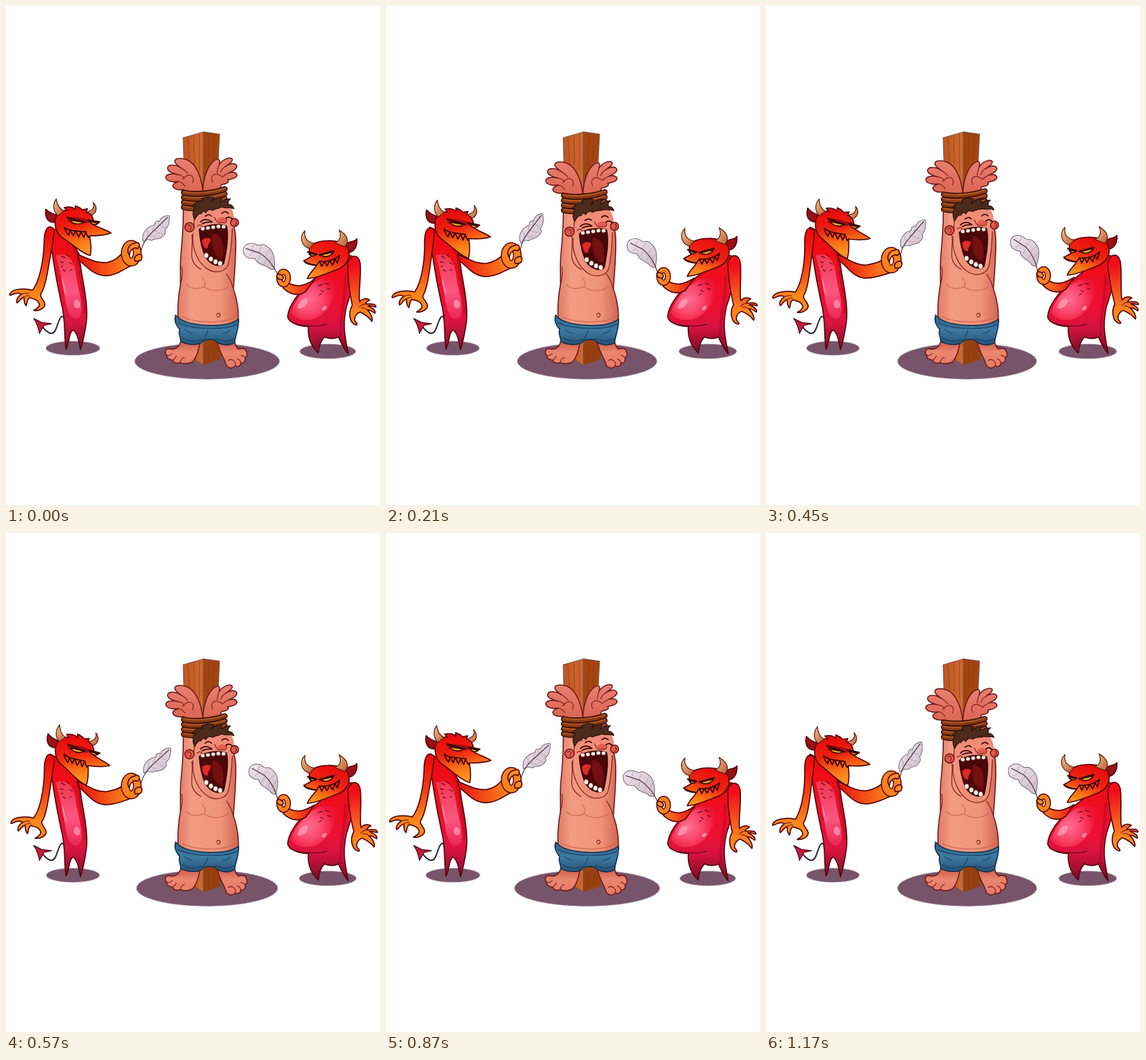
Write an HTML page that moves like this. It is 648 px wide and 864 px high and loops after 1.2 s.

```html
<!DOCTYPE html>
<html lang="en">
<head>
<meta charset="utf-8">
<title>Tickle</title>
<style>
html, body { margin: 0; width: 100%; height: 100%; overflow: hidden; background: #fff; }
svg { display: block; width: 648px; height: 864px; }
path, ellipse, circle { stroke-linejoin: round; stroke-linecap: round; }
.shade { fill: #78546a; stroke: #b5abbb; stroke-width: 1; }
.skin { stroke: #6e1c1c; stroke-width: 1.9; }
.dev { stroke: #56060c; stroke-width: 2; }
.ln { fill: none; stroke: #842723; stroke-width: 1.5; }
.ink { fill: none; stroke: #360505; stroke-width: 2; }
.thin { fill: none; stroke: #5e0a18; stroke-width: 1.4; }
.soft { fill: none; stroke: #c95c4a; stroke-width: 2; opacity: .6; }
.dusk { fill: none; stroke: #8c0a20; stroke-width: 5; opacity: .35; }
.horn { fill: url(#horn); stroke: #642010; stroke-width: 1.5; }
.vane { fill: url(#vane); stroke: #7a6a76; stroke-width: 1.2; }
.quill { fill: none; stroke: #46303a; stroke-width: 1.4; }
.barb { fill: none; stroke: #ad9aa8; stroke-width: .9; }
.rope { fill: none; stroke: #3a1006; stroke-width: 10; }
.cord { fill: none; stroke: #8a3a16; stroke-width: 6.6; }
.gleam { fill: none; stroke: #b9602c; stroke-width: 1.6; }
.eye { fill: #ffae18; stroke: #360606; stroke-width: 2; }
.tooth { fill: #fff4ea; stroke: #5d1a18; stroke-width: .8; }
</style>
</head>
<body>
<svg viewBox="0 0 648 864" xmlns="http://www.w3.org/2000/svg">
<defs>
  <linearGradient id="skin" gradientUnits="userSpaceOnUse" x1="300" y1="0" x2="403" y2="0">
    <stop offset="0" stop-color="#e47c68"/><stop offset=".2" stop-color="#f29c83"/><stop offset=".7" stop-color="#ee947a"/><stop offset="1" stop-color="#d26553"/>
  </linearGradient>
  <linearGradient id="cheek" gradientUnits="userSpaceOnUse" x1="0" y1="350" x2="0" y2="462">
    <stop offset="0" stop-color="#ef8a76"/><stop offset=".5" stop-color="#f09680"/><stop offset="1" stop-color="#ec8d75"/>
  </linearGradient>
  <linearGradient id="palm" x1="0" y1="0" x2="0" y2="1">
    <stop offset="0" stop-color="#e97f70"/><stop offset="1" stop-color="#d9614f"/>
  </linearGradient>
  <linearGradient id="foot" gradientUnits="userSpaceOnUse" x1="0" y1="582" x2="0" y2="626">
    <stop offset="0" stop-color="#cf5c4b"/><stop offset=".4" stop-color="#ea8670"/><stop offset="1" stop-color="#e57a66"/>
  </linearGradient>
  <linearGradient id="denim" x1="0" y1="0" x2="0" y2="1">
    <stop offset="0" stop-color="#2f628a"/><stop offset=".5" stop-color="#3d7aa3"/><stop offset="1" stop-color="#275276"/>
  </linearGradient>
  <linearGradient id="oak" gradientUnits="userSpaceOnUse" x1="306" y1="0" x2="343" y2="0">
    <stop offset="0" stop-color="#bd5520"/><stop offset="1" stop-color="#d06c30"/>
  </linearGradient>
  <linearGradient id="oakDark" gradientUnits="userSpaceOnUse" x1="0" y1="220" x2="0" y2="620">
    <stop offset="0" stop-color="#a5460f"/><stop offset="1" stop-color="#96400f"/>
  </linearGradient>
  <linearGradient id="horn" x1="0" y1="0" x2="1" y2="1">
    <stop offset="0" stop-color="#f3c290"/><stop offset="1" stop-color="#b85c32"/>
  </linearGradient>
  <linearGradient id="vane" x1="0" y1="0" x2="1" y2="1">
    <stop offset="0" stop-color="#efe6ed"/><stop offset="1" stop-color="#cdbbc8"/>
  </linearGradient>
  <linearGradient id="body" gradientUnits="userSpaceOnUse" x1="0" y1="385" x2="0" y2="600">
    <stop offset="0" stop-color="#f00a0c"/><stop offset=".45" stop-color="#ea1028"/><stop offset=".75" stop-color="#dc1440"/><stop offset="1" stop-color="#76102a"/>
  </linearGradient>
  <linearGradient id="bodyR" gradientUnits="userSpaceOnUse" x1="0" y1="435" x2="0" y2="602">
    <stop offset="0" stop-color="#f00c12"/><stop offset=".5" stop-color="#ee1032"/><stop offset=".72" stop-color="#d81240"/><stop offset="1" stop-color="#760c24"/>
  </linearGradient>
  <linearGradient id="belly" gradientUnits="userSpaceOnUse" x1="0" y1="428" x2="0" y2="545">
    <stop offset="0" stop-color="#f0364c"/><stop offset=".55" stop-color="#fb5680"/><stop offset="1" stop-color="#ea2450"/>
  </linearGradient>
  <radialGradient id="bellyR" gradientUnits="userSpaceOnUse" cx="524" cy="508" r="46">
    <stop offset="0" stop-color="#ff6f92"/><stop offset=".5" stop-color="#fb476e"/><stop offset="1" stop-color="#ee1434"/>
  </radialGradient>
  <linearGradient id="limb" gradientUnits="userSpaceOnUse" x1="0" y1="395" x2="0" y2="500">
    <stop offset="0" stop-color="#f00c0c"/><stop offset=".45" stop-color="#f03a12"/><stop offset="1" stop-color="#fb8a1a"/>
  </linearGradient>
  <linearGradient id="limbR" gradientUnits="userSpaceOnUse" x1="0" y1="450" x2="0" y2="530">
    <stop offset="0" stop-color="#f00e1c"/><stop offset="1" stop-color="#fb861e"/>
  </linearGradient>
  <linearGradient id="reach" gradientUnits="userSpaceOnUse" x1="125" y1="0" x2="215" y2="0">
    <stop offset="0" stop-color="#e21010"/><stop offset=".5" stop-color="#f24e16"/><stop offset="1" stop-color="#fb861c"/>
  </linearGradient>
  <linearGradient id="reachR" gradientUnits="userSpaceOnUse" x1="530" y1="0" x2="478" y2="0">
    <stop offset="0" stop-color="#ea1418"/><stop offset="1" stop-color="#fb861c"/>
  </linearGradient>
  <linearGradient id="faceL" gradientUnits="userSpaceOnUse" x1="112" y1="352" x2="134" y2="424">
    <stop offset="0" stop-color="#e90a0c"/><stop offset=".4" stop-color="#ee220e"/><stop offset=".75" stop-color="#f87016"/><stop offset="1" stop-color="#fb9420"/>
  </linearGradient>
  <linearGradient id="faceR" gradientUnits="userSpaceOnUse" x1="566" y1="406" x2="542" y2="470">
    <stop offset="0" stop-color="#e90a0c"/><stop offset=".45" stop-color="#ee2412"/><stop offset=".8" stop-color="#f87016"/><stop offset="1" stop-color="#fb9420"/>
  </linearGradient>
</defs>

<ellipse id="shM" class="shade" cx="348.5" cy="615" ry="31.2"/>
<ellipse id="shL" class="shade" cx="116" cy="592.5" ry="12.3"/>
<ellipse id="shR" class="shade" cx="557.5" cy="598" ry="12.8"/>

<!-- post -->
<g stroke="#7b5148" stroke-width="1.3">
  <path d="M307 228L342 218L342 622L328 613L312 400Z" fill="url(#oak)"/>
  <path d="M342 218L370 222L366 300L372 612L342 622Z" fill="url(#oakDark)"/>
</g>
<path class="ln" opacity=".45" d="M315 228L318 270M326 224C324 240 328 250 326 275M335 222L335 285M351 222L350 275M361 222C358 240 361 250 358 268M350 592L351 616M361 590L360 612"/>

<!-- tied man -->
<path class="skin" fill="url(#skin)" d="M307 340C308 372 306 400 303 430C301 455 303 470 302 484C298 505 297 530 299 552C330 562 380 562 402 550C404 530 402 512 394 490C396 460 399 430 398 402C397 375 386 365 384 338Z"/>
<path class="ln" d="M322 396C324 412 321 424 322 436C324 446 330 452 338 456M305 452C307 466 304 476 302 484M393 488C391 476 386 470 382 464"/>
<path class="soft" d="M312 482C322 492 334 490 343 486C356 496 374 494 386 486M340 470C346 478 346 482 343 486M306 538C330 550 380 550 396 538"/>
<path class="ln" d="M365 535C366 531 371 531 371 535C371 538 368 539 366 538"/>
<g id="hands">
  <path class="skin" fill="url(#palm)" d="M341 320C339 300 331 273 313 266C300 262 290 264 293 271C296 276 300 278 304 281C296 275 282 273 280 280C279 287 290 290 298 292C288 289 275 291 277 298C280 305 292 305 299 304C292 306 286 310 291 315C297 320 305 318 308 318L308 330L341 330Z"/>
  <path class="skin" fill="url(#palm)" d="M341 320C342 300 348 276 362 267C369 263 372 267 369 275C373 268 384 261 391 264C395 268 387 273 380 278C388 272 398 271 400 277C400 283 392 286 386 289C394 286 401 289 400 294C397 300 388 300 384 301C388 304 383 308 374 309C370 315 372 318 378 317L378 330L341 330Z"/>
  <path class="ln" d="M304 281C309 284 313 287 315 290M298 292C304 293 308 296 309 299M306 300C317 286 329 295 323 306M299 304C305 305 308 309 310 312M369 275C367 281 366 286 366 289M380 278C375 281 373 285 372 288M375 296C362 286 352 294 358 305M386 289C380 291 377 294 375 296"/>
</g>
<g id="rope"></g>
<path class="skin" fill="url(#foot)" d="M303 580C300 592 292 596 282 593C274 594 275 603 279 605C277 611 286 613 289 613C291 620 299 619 302 617C309 622 317 619 322 617C330 610 333 598 336 584Z"/>
<path class="skin" fill="url(#foot)" d="M366 582C370 600 378 610 380 617C382 628 392 629 397 623C402 626 407 623 407 618C413 619 416 614 414 609C419 607 418 600 416 598C416 592 408 592 403 594C398 590 397 586 396 580Z"/>
<path class="ln" d="M279 605C283 606 286 604 288 602M289 613C292 611 294 609 295 606M302 617C303 612 306 609 309 609M397 623C400 616 391 609 385 614M407 618C406 614 404 612 401 611M414 609C412 606 410 605 407 605"/>
<path fill="url(#denim)" stroke="#14304a" stroke-width="1.9" d="M294 535C303 547 325 552 350 553C375 554 393 550 403 542C404 557 398 568 396 583C386 589 370 588 361 578C353 577 348 577 341 580C338 588 316 588 303 581C302 570 298 567 301 560C294 552 291 545 294 535Z"/>
<path fill="none" stroke="#1d456a" stroke-width="1.5" d="M298 548C320 560 380 562 400 551M341 580C344 574 348 569 350 562M305 574C316 581 330 582 340 577M363 575C374 582 386 581 396 576M309 560C315 564 318 566 322 567M389 561C383 566 379 567 376 567"/>

<g id="face">
  <path fill="url(#cheek)" d="M329 350C325 368 325 383 323 398C322 425 332 446 350 456C364 464 381 461 385 447C390 430 391 405 392 390C397 372 396 356 388 347Z"/>
  <path class="ln" d="M328 356C326 366 325 374 326 384M324 394C321 420 333 446 350 456C364 464 381 460 385 447C389 430 391 412 392 386"/>
  <circle class="skin" cx="318" cy="383" r="8" fill="#dd594f"/>
  <circle class="skin" cx="396" cy="375" r="7" fill="#dd594f"/>
  <path class="ln" d="M314 380C319 377 323 382 319 388M397 371C401 375 399 379 396 379"/>
  <path fill="#4a080a" stroke="#360505" stroke-width="2" d="M335 387C345 379 368 376 382 381C386 398 382 424 377 446C370 453 354 448 346 435C339 420 336 403 335 387Z"/>
  <path fill="#74100f" d="M358 394C374 396 380 412 375 438C362 436 354 418 358 394Z"/>
  <path fill="#df2a26" stroke="#6d0d12" d="M339 406C342 401 350 400 355 403C356 409 350 411 350 419C346 422 343 419 341 414Z"/>
  <g id="teeth"></g>
  <path class="ink" d="M337 374C343 368 351 369 357 374M340 377C347 373 352 374 357 374M380 369C384 364 389 365 392 369M345 364C350 360 354 361 356 364M374 359C378 355 382 356 385 359" stroke-width="1.5"/>
  <path class="ln" d="M331 381C335 378 338 379 340 381M361 366C363 369 364 371 365 373"/>
  <ellipse cx="374" cy="371" rx="7.5" ry="5" fill="#e65a52"/>
  <path class="ln" d="M366 373C367 377 372 376 375 375C380 377 383 374 382 370"/>
</g>
<path id="hair" fill="#4c2a1c" stroke="#2a120c" stroke-width="1.4" d="M327 370C322 361 324 352 328 347L322 348C327 340 334 337 341 338L339 334C347 330 355 330 360 332C357 335 356 338 356 340C361 334 368 331 376 331C372 335 371 338 372 340C376 336 382 334 389 334C384 338 384 341 385 344C390 343 393 346 395 351C386 347 380 352 374 348C368 352 362 350 358 354C354 352 350 351 346 358C343 354 341 354 338 360C335 358 330 363 327 370Z"/>

<!-- slim devil -->
<path fill="none" stroke="#2c2a40" stroke-width="2.4" d="M102 542C96 530 92 544 87 558C82 572 73 568 63 555"/>
<path fill="#c81a38" stroke="#421024" stroke-width="1.5" d="M48 541L62 548L79 550L66 553L58 567C56 556 53 548 48 541Z"/>
<path class="dev" fill="url(#body)" d="M76 383C76 410 86 470 96 515C104 545 100 570 104 594C110 585 108 566 116 561C124 566 126 580 129 595C134 580 140 550 140 535C141 500 129 465 127 430L108 398Z"/>
<path class="dusk" d="M104 400C112 412 121 420 124 432C127 468 137 500 137 530"/>
<path fill="url(#belly)" d="M86 432C105 426 118 435 122 470C127 500 135 520 129 537C116 549 106 535 102 505C97 475 92 452 86 432Z"/>
<path fill="#ffa0b8" opacity=".7" d="M119 510C125 505 132 517 126 523C119 525 115 518 119 510ZM97 470C102 480 101 490 106 502C100 495 97 482 97 470Z"/>
<path class="thin" d="M96 433L102 436M105 430L109 434M94 443L99 444M110 444L115 447M99 457L103 459M111 458L114 456M96 452L98 450"/>
<path id="reachL" class="dev" fill="url(#reach)"/>
<g id="armL">
  <path class="dev" fill="url(#limb)" d="M84 387C72 375 66 389 66 410C65 445 57 478 46 492C35 489 12 488 7 498C5 502 8 501 12 499C20 496 24 497 27 499C20 503 17 510 19 514C23 512 24 507 31 504C32 508 30 514 35 519C37 514 36 508 41 505C46 507 57 508 58 518C55 525 50 525 48 527C58 529 69 522 67 515C65 507 59 506 60 499C70 486 75 440 81 410Z"/>
  <path class="ln" d="M27 499C32 497 36 497 39 498M31 504C35 501 38 501 41 502"/>
</g>
<g id="featherL">
  <path class="vane" d="M238 408C233 394 245 381 258 379C256 375 262 371 266 373C268 365 278 362 283 363C284 374 281 384 275 388C278 392 276 396 270 400C268 404 258 402 252 406C246 403 242 405 238 408Z"/>
  <path class="barb" d="M246 400L245 388M254 391L256 380M262 384L265 374M249 397L260 400M258 389L270 395M267 380L275 384"/>
  <path class="quill" d="M232 430C236 415 240 405 252 393L280 366"/>
</g>
<g id="handL">
  <ellipse cx="217" cy="428" rx="10.5" ry="15.5" fill="none" stroke="#56060c" stroke-width="15"/>
  <ellipse cx="217" cy="428" rx="10.5" ry="15.5" fill="none" stroke="#f98220" stroke-width="11.4"/>
  <path class="dev" fill="#fa8c24" d="M222 411C232 406 233 416 228 420C221 416 214 424 214 431C208 424 212 413 222 411ZM224 442C220 436 226 429 233 430C237 431 236 440 232 441Z"/>
</g>
<g id="headL">
  <path class="dev" fill="#98101a" d="M69 352C67 366 72 377 88 374L90 362C80 361 75 357 69 352Z"/>
  <path class="horn" d="M151 340C155 350 148 354 140 357L145 364C157 360 160 349 151 340Z"/>
  <path class="dev" fill="url(#faceL)" d="M86 366C92 356 97 353 106 354L101 349C110 347 116 348 120 352L120 346C126 348 130 350 132 353L141 351L139 357C148 359 153 368 151 378C160 384 175 388 182 393C170 398 155 398 145 398C147 410 148 424 146 432C132 429 112 410 99 402C87 395 83 380 86 366Z"/>
  <path class="horn" d="M87 334C80 345 82 356 90 363L100 355C92 350 89 345 87 334Z"/>
  <path fill="#a80c10" d="M104 366C118 364 136 366 150 372L139 376L108 374Z"/>
  <path class="eye" d="M111 371L134 374C130 379 115 379 111 371ZM145 373L160 376C156 380 148 379 145 373Z"/>
  <path class="ink" style="stroke-width:3" d="M106 366L136 374M143 371L162 374"/>
  <path class="ink" d="M101 383C103 391 106 394 109 397L111 388L117 398L120 389L126 400L130 391L135 401L138 392L143 401L145 398M101 383C104 386 107 387 111 388C121 390 130 390 139 391"/>
</g>

<!-- stout devil -->
<path class="dev" fill="url(#bodyR)" d="M545 464C520 482 490 512 488 538C490 550 512 555 524 555C522 575 530 590 541 601C542 590 544 580 552 573C561 577 568 577 576 573C581 584 586 595 593 602C588 575 582 555 590 520C600 490 612 450 600 433C582 428 560 450 545 464Z"/>
<path class="dusk" d="M588 470C590 500 578 540 580 572"/>
<path fill="url(#bellyR)" d="M532 480C548 468 571 470 571 482C572 505 558 532 536 541C518 547 498 543 494 530C500 510 516 492 532 480Z"/>
<path fill="#ffa3b4" opacity=".75" d="M508 514C515 504 525 504 522 514C518 523 506 527 505 522ZM548 522C554 516 558 520 554 525C550 529 546 527 548 522Z"/>
<path class="thin" d="M492 546C508 555 540 556 556 551M541 484L548 482M553 480L559 482M545 492L550 495M557 489L562 491M543 500L546 498"/>
<g id="armR">
  <path class="dev" fill="url(#limbR)" d="M592 445C600 426 614 432 614 450C615 475 610 500 613 512C616 507 624 505 630 509C627 512 624 511 622 516C630 516 640 514 641 521C638 522 634 518 627 519C632 521 642 527 639 532C636 530 632 526 626 526C630 530 637 540 634 546C630 540 622 534 614 530C607 532 602 540 605 546C608 549 610 553 606 552C594 548 593 530 600 518C596 500 592 475 592 445Z"/>
  <path class="ln" d="M622 516C617 517 614 519 612 521M626 526C622 523 619 522 616 523"/>
</g>
<g id="featherR">
  <path class="vane" d="M412 428C408 416 418 410 428 411C435 413 437 416 440 414C446 411 452 416 457 420C465 428 466 440 465 456C461 457 456 455 452 451C440 447 434 444 431 437C420 438 414 435 412 428Z"/>
  <path class="barb" d="M426 423L428 414M438 427L443 416M449 434L456 422M457 443L463 431M430 425L422 433M441 429L437 440M452 437L447 448"/>
  <path class="quill" d="M473 471C467 455 458 440 440 428L416 420"/>
</g>
<g id="handR">
  <path class="dev" fill="url(#reachR)" d="M534 474C517 484 505 488 490 480L480 488C492 500 506 503 519 495Z"/>
  <ellipse cx="481" cy="471" rx="7.5" ry="11" fill="none" stroke="#56060c" stroke-width="10.5"/>
  <ellipse cx="481" cy="471" rx="7.5" ry="11" fill="none" stroke="#f98220" stroke-width="7"/>
  <path class="dev" fill="#fa8c24" d="M469 468C469 462 478 464 481 470C480 476 472 475 469 468Z"/>
</g>
<g id="headR">
  <path class="dev" fill="#98101a" d="M588 414C594 405 604 410 608 403C609 418 602 428 590 427Z"/>
  <path class="dev" fill="url(#faceR)" d="M526 418C535 403 580 402 592 418C599 435 591 448 577 455C555 463 538 471 522 472C526 462 534 456 538 449C528 449 518 446 516 441C523 437 530 435 531 430C525 428 525 422 526 418Z"/>
  <path class="horn" d="M518 389C507 400 512 416 526 420L534 411C520 408 516 400 518 389Z"/>
  <path class="horn" d="M577 388C591 396 596 407 587 417L570 410C580 406 581 397 577 388Z"/>
  <path class="eye" d="M545 431L567 426C564 433 552 437 545 431ZM525 429L537 430C534 434 528 434 525 429Z"/>
  <path class="ink" style="stroke-width:3" d="M543 431L568 424M523 426L538 430"/>
  <path class="ink" d="M538 449L543 442L547 451L552 442L556 450L561 441L566 449L570 438L574 445L578 432M538 449C530 448 522 446 516 441M543 442C556 444 570 439 578 432"/>
</g>
</svg>
<script>
const $ = id => document.getElementById(id);
const LOOP = 1200, CYCLE = 900, STEP = 30;

// Points of one swing; each track holds the values at these moments.
const KEYS = [0, 90, 210, 270, 450, 570, 750];
const TRACKS = {
  lift: [0, 3, 6, 5.6, 4, 0, -3],
  shade: [125.5, 124, 121, 120.7, 120.5, 122.5, 126.5],
  headX: [0, -1, 2, 2, 5, 6, 4],
  headY: [0, -1, 2, 1.5, 0, -2, -5],
  nod: [0, .5, 2.9, 3.7, 5.9, 7.3, 5.9],
  swing: [0, 2, 4, 5, 5, 2, -1],
  reach: [0, -1, 4, 6, 12, 10, 0],
  plumeX: [0, -2, -4, -5, -3, 1, 1],
  plumeY: [0, 0, 3, 6, 11, 8, 3],
  plume: [0, -5.4, -8.8, -9.8, -5, 1.9, 5.5],
  bob: [0, -1.5, -4, -5.5, -6, -4, .7],
  armR: [0, 1, 2.5, 4, 5, 3, 0],
  plumeR: [0, 2.5, 8, 10.5, 14.5, 11.5, 1]
};

// Closed smooth curve through a track.
function at(track, t) {
  const n = KEYS.length;
  let i = n - 1;
  while (KEYS[i] > t) i--;
  const time = k => KEYS[(k + n) % n] + CYCLE * Math.floor(k / n);
  const val = k => track[(k + n) % n];
  const slope = k => (val(k + 1) - val(k - 1)) / (time(k + 1) - time(k - 1));
  const d = time(i + 1) - time(i), u = (t - time(i)) / d, u2 = u * u, u3 = u2 * u;
  return (2 * u3 - 3 * u2 + 1) * val(i) + (u3 - 2 * u2 + u) * d * slope(i)
    + (3 * u2 - 2 * u3) * val(i + 1) + (u3 - u2) * d * slope(i + 1);
}

function place(id, x, y, angle = 0, px = 0, py = 0) {
  $(id).setAttribute("transform", `translate(${x} ${y}) rotate(${angle} ${px} ${py})`);
}

function build() {
  let cords = "";
  for (let i = 3; i >= 0; i--) {
    const y = 323 + i * 8.5;
    const d = `M308 ${y}C325 ${y + 4} 357 ${y + 2} 379 ${y - 6}`;
    cords += `<path class="rope" d="${d}"/><path class="cord" d="${d}"/><path class="gleam" d="${d}" transform="translate(0 -1.5)"/>`;
  }
  $("rope").innerHTML = cords;

  const tooth = (x, y, rx, ry) => `<ellipse class="tooth" cx="${x}" cy="${y}" rx="${rx}" ry="${ry}"/>`;
  let teeth = "";
  for (let i = 0; i < 5; i++) {
    teeth += tooth(341 + i * 9, 385.5 - i * 1.2 + (i === 4 ? 1.5 : 0), 3.8, 3.4);
    if (i < 4) teeth += tooth(347 + i * 8, 432 + i * 7 - i * i * .8, 4, 4.5);
  }
  $("teeth").innerHTML = teeth;
}

function draw(ms) {
  const t = Math.floor((ms % LOOP) / STEP) * STEP % CYCLE;
  const v = {};
  for (const k in TRACKS) v[k] = at(TRACKS[k], t);

  $("shM").setAttribute("rx", v.shade);
  $("shL").setAttribute("rx", 46 + (v.shade - 121) / 5);
  $("shR").setAttribute("rx", 48.5 + (125.5 - v.shade) / 3);

  place("hands", 0, v.lift);
  place("rope", 0, v.lift * .85);
  place("face", 0, v.lift * 1.2, -v.lift * .15, 356, 380);
  place("hair", 0, v.lift * .55);

  place("armL", 0, v.swing * .5, -v.swing * .5, 73, 385);
  place("headL", v.headX, v.headY, v.nod, 87, 334);
  place("handL", 0, v.reach);
  place("featherL", v.plumeX, v.plumeY, v.plume, 236, 410);
  const h = v.reach, m = h * .35;
  $("reachL").setAttribute("d", `M124 430C140 436 155 ${446 + m} 175 ${444 + m}C190 ${441 + m} 198 ${432 + h} 204 ${425 + h}`
    + `L221 ${448 + h}C208 ${452 + h} 194 ${466 + m} 175 ${467 + m}C152 ${468 + m} 140 450 127 441Z`);

  place("armR", 0, -v.armR * .4, -v.armR * .65, 602, 440);
  place("headR", 0, v.bob);
  place("handR", 0, v.bob * .7);
  place("featherR", 0, v.bob * .6, v.plumeR, 471, 467);
}

build();
const start = performance.now();
function tick() {
  draw(performance.now() - start);
  requestAnimationFrame(tick);
}
tick();
</script>
</body>
</html>
```
